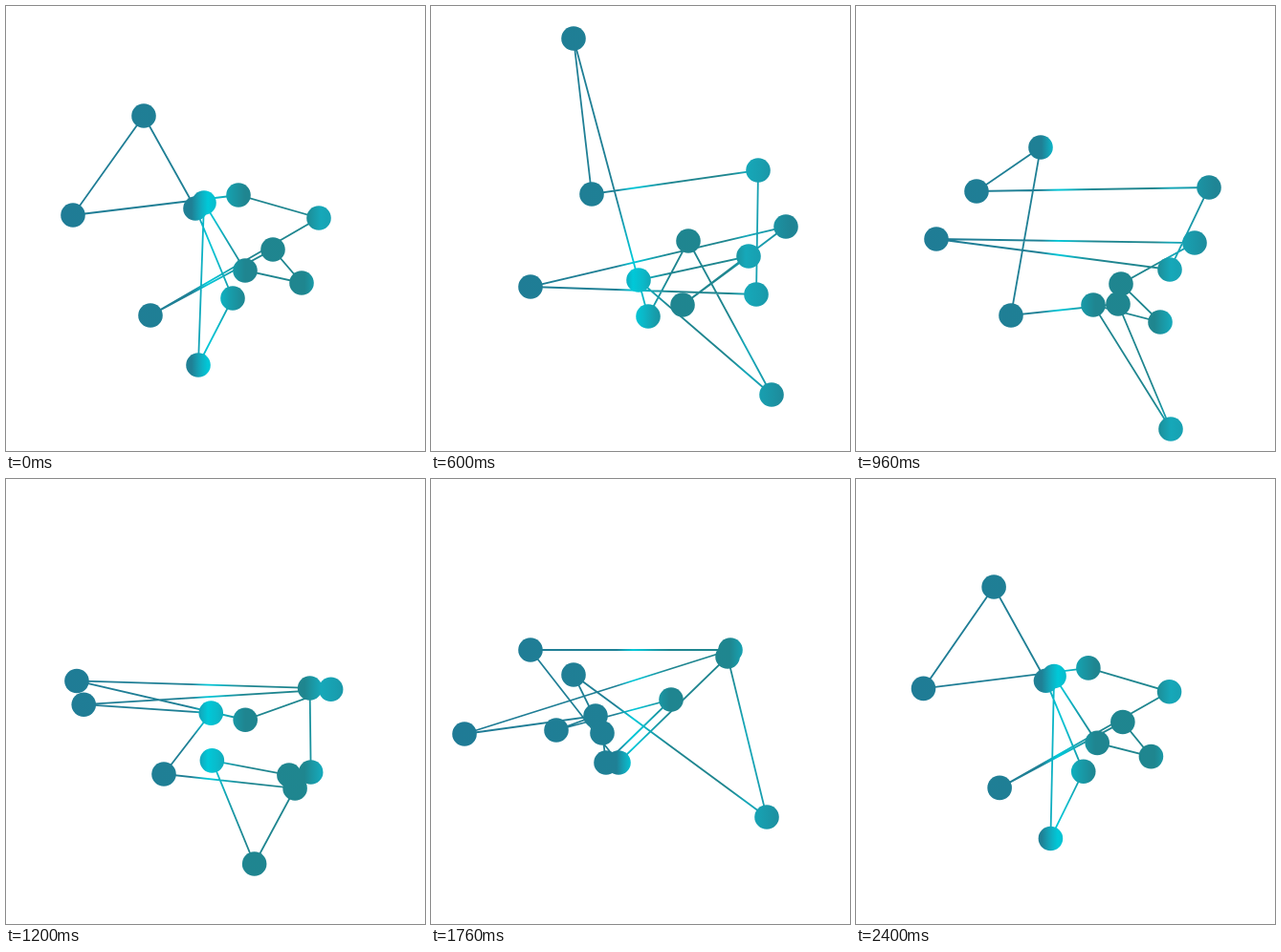
An HTML page with a canvas for the animation above (2440 ms loop, 438 by 466 pixels).

```html
<!DOCTYPE html>
<html lang="en">
<head>
<meta charset="utf-8">
<title>Drifting ring of nodes</title>
<style>
  html, body { margin: 0; width: 100%; height: 100%; overflow: hidden; background: #fff; }
  canvas { display: block; }
</style>
</head>
<body>
<canvas id="stage" width="438" height="466"></canvas>
<script>
const ctx = document.getElementById('stage').getContext('2d');
const FRAME = 40, LOOP = 2440, STEP = 0.105, RADIUS = 12.8;

// Angles of the poses that each closed path runs through
const knots = [0, 15, 24, 36, 44, 53].map(n => n * STEP);

const path = (x, y) => ({ x, y });
const nodes = [
  path([201, 356, 329, 213, 183, 138], [376, 407, 443, 335, 297, 340]),
  path([237, 269, 274, 306, 251, 216], [306, 246, 312, 283, 231, 263]),
  path([198, 227, 162, 162, 131, 171], [212, 325, 324, 288, 263, 258]),
  path([144, 149, 193, 209, 172, 141], [115, 34, 148, 284, 248, 190]),
  path([70, 168, 126, 48, 35, 58], [219, 197, 194, 277, 267, 216]),
  path([243, 342, 369, 318, 313, 271], [198, 172, 190, 218, 179, 189]),
  path([327, 340, 328, 141, 104, 255], [222, 302, 276, 220, 179, 193]),
  path([151, 104, 84, 111, 196, 192], [324, 294, 244, 223, 297, 342]),
  path([279, 371, 354, 301, 310, 302], [255, 231, 248, 179, 186, 252]),
  path([309, 263, 277, 351, 351, 331], [290, 313, 291, 345, 354, 291]),
  path([250, 332, 318, 240, 149, 160], [277, 262, 331, 242, 205, 270]),
  path([207, 217, 248, 178, 179, 197], [206, 287, 313, 281, 266, 210])
];

const ink = ctx.createLinearGradient(0, 0, 438, 0);
[
  [0, '#1f7a96'], [194, '#1f8095'], [203, '#12a9bc'], [211, '#00c8d8'],
  [221, '#0abaca'], [234, '#179dab'], [250, '#1f8590'], [312, '#1f868f'],
  [329, '#16a8b9'], [344, '#189fb0'], [375, '#1f8595'], [438, '#1f8095']
].forEach(([x, color]) => ink.addColorStop(x / 438, color));

// Trigonometric interpolation weights, periodic in the angle
function weights(angle) {
  return knots.map((a, i) => knots.reduce(
    (w, b, k) => k === i ? w : w * Math.sin((angle - b) / 2) / Math.sin((a - b) / 2),
    Math.cos((angle - a) / 2)
  ));
}

const blend = (values, w) => values.reduce((sum, v, i) => sum + v * w[i], 0);

function draw(now) {
  const frame = Math.floor((now % LOOP) / FRAME);
  const w = weights(frame * STEP);
  const spots = nodes.map(n => [blend(n.x, w), blend(n.y, w)]);

  ctx.clearRect(0, 0, 438, 466);
  ctx.strokeStyle = ctx.fillStyle = ink;
  ctx.lineWidth = 1.8;
  ctx.beginPath();
  spots.forEach(([x, y]) => ctx.lineTo(x, y));
  ctx.closePath();
  ctx.stroke();

  for (const [x, y] of spots) {
    ctx.beginPath();
    ctx.arc(x, y, RADIUS, 0, Math.PI * 2);
    ctx.fill();
  }
}

const start = performance.now();
function tick() {
  draw(performance.now() - start);
  requestAnimationFrame(tick);
}
tick();
</script>
</body>
</html>
```
